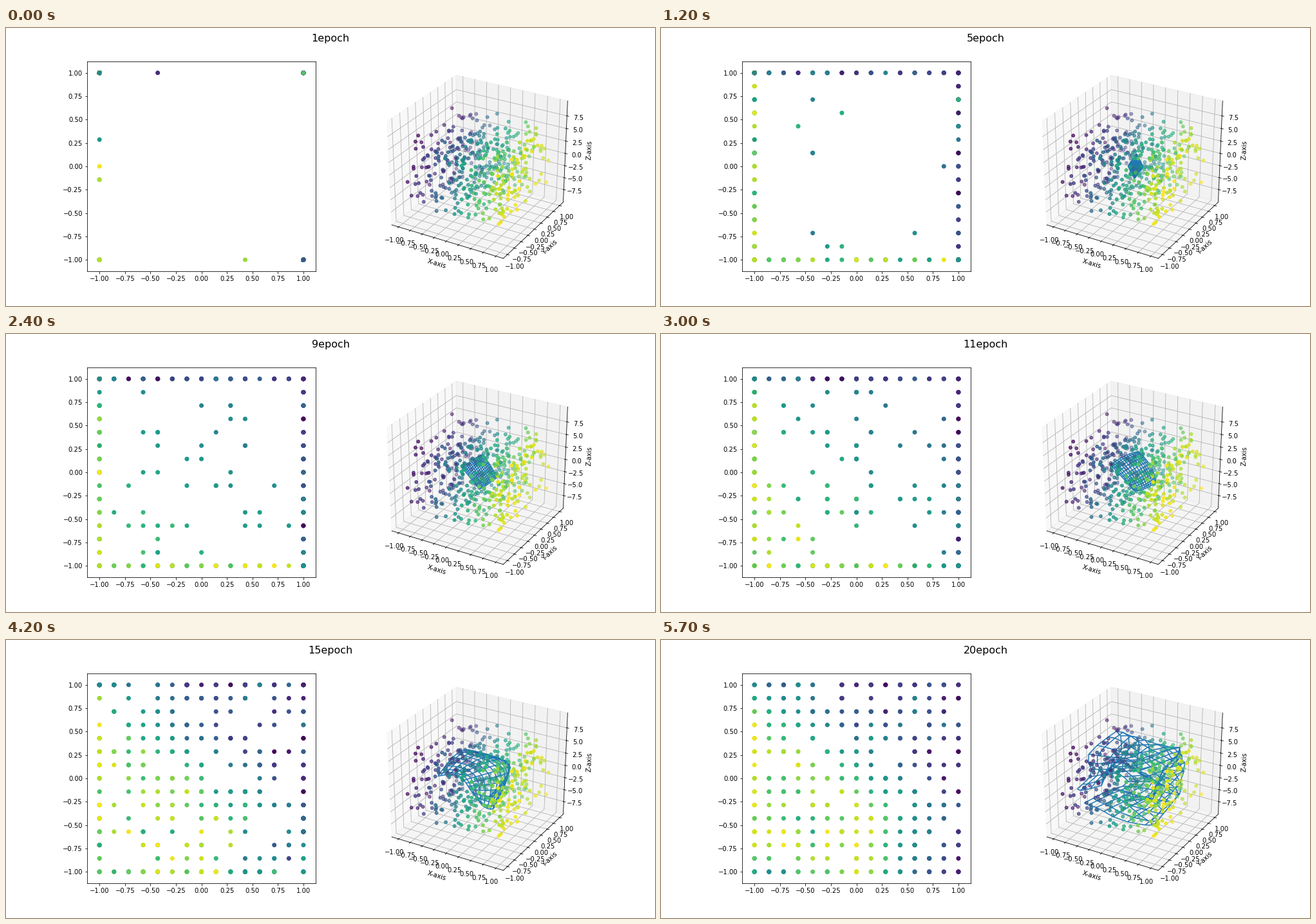
Write a matplotlib script that moves like this. It is 1008 by 432 pixels and loops after 6 s.

```python
import numpy as np
import matplotlib.pyplot as plt
from matplotlib.animation import FuncAnimation
from matplotlib.collections import LineCollection

plt.rcParams["font.family"] = "DejaVu Sans"

EPOCHS, INTERVAL = 20, 300
SIDE = 15                           # map nodes per side
COUNT = 480
BOX = np.array([1, 1, 6])           # half size of the data cloud
CENTER = np.array([0, 0, 0.12])     # middle and length of the cube axes
SPAN = np.array([2.2, 2.2, 19.76])
EDGE = 0.5 + 1 / 48                 # panes reach slightly past the unit cube
BACK = np.array([-1, 1, -1])        # corner where the three panes meet
VIEW = (-0.095, 0.09)
DIST = 10

# camera basis
ELEV, AZIM = np.radians([30, -60])
FRONT = np.array([np.cos(ELEV) * np.cos(AZIM), np.cos(ELEV) * np.sin(AZIM), np.sin(ELEV)])
RIGHT = np.array([-np.sin(AZIM), np.cos(AZIM), 0])
UP = np.cross(FRONT, RIGHT)

rng = np.random.default_rng(3)
fig = plt.figure(figsize=(14, 6), dpi=72)
fig.subplots_adjust(left=0.125, right=0.9, bottom=0.125, top=0.88, wspace=0.2)
flat = fig.add_subplot(1, 2, 1)
space = fig.add_subplot(1, 2, 2)
title = fig.suptitle("1epoch", fontsize=16)


def project(p):
    """Perspective view of points in the unit cube."""
    p = np.asarray(p, float)
    depth = DIST - p @ FRONT
    return np.stack([p @ RIGHT / depth, p @ UP / depth], axis=-1)


def to_unit(data):
    return (data - CENTER) / SPAN


def sq_dist(a, b):
    return ((a[:, None] - b[None]) ** 2).sum(axis=2)


def train(data):
    """Batch self-organising map; returns (mesh, winners) for each epoch."""
    weight = np.array([1, 1, 0.25])
    scaled = data * weight
    steps = np.linspace(-1, 1, SIDE)
    nodes = np.stack(np.meshgrid(steps, steps), axis=-1).reshape(-1, 2)

    # start almost collapsed, with a slight tilt towards width and height
    width, height = 0.4 * scaled @ RIGHT, scaled[:, 2]
    latent = 0.06 * np.column_stack([-width - height, -width + height])
    latent += rng.uniform(-0.05, 0.05, latent.shape)

    history = []
    for t in range(EPOCHS):
        sigma = max(0.14, 1.75 - 0.096 * t)
        pull = np.exp(-sq_dist(nodes, latent) / (2 * sigma ** 2))
        mesh = pull @ scaled / pull.sum(axis=1, keepdims=True)
        latent = nodes[sq_dist(scaled, mesh).argmin(axis=1)]
        history.append(((mesh / weight).reshape(SIDE, SIDE, 3), latent))
    return history


def mesh_lines(mesh):
    view = project(to_unit(mesh))
    return [*view, *view.transpose(1, 0, 2)]


def draw_pane(axis, grey):
    corners = np.full((4, 3), BACK[axis] * EDGE)
    a, b = {0, 1, 2} - {axis}
    corners[:, a] = EDGE * np.array([-1, 1, 1, -1])
    corners[:, b] = EDGE * np.array([-1, -1, 1, 1])
    color = (grey, grey, grey, 0.5)
    space.fill(*project(corners).T, facecolor=color, edgecolor=color,
               linewidth=1, zorder=0)


def draw_axis(axis, side, values, fmt, label):
    """Grid, line, ticks and texts of the axis along the cube edge at `side`."""
    side = np.array(side)
    unit = np.eye(3)[axis]
    base = side * EDGE
    grid = EDGE * np.array([side, BACK * (1 - unit), -side])
    out = side * np.eye(3)[1 if axis == 0 else 0] / 120
    size = space.get_window_extent().size
    per_point = 4 / size.sum()

    ends = project([base - EDGE * unit, base + EDGE * unit])
    space.plot(*ends.T, color="k", lw=0.8, zorder=2)
    for v in values:
        at = to_unit(v * unit) * unit
        space.plot(*project(grid + at).T, color="#b0b0b0", lw=0.8, zorder=1)
        tick = project([base + at + 2 * out, base + at - out])
        space.plot(*tick.T, color="k", lw=0.8, zorder=2)
        spot = project(base + at + side * 11.5 * per_point)
        space.text(*spot, (fmt % v).replace("-", "\u2212"), fontsize=10,
                   ha="center", va="top", zorder=2)

    dx, dy = (ends[1] - ends[0]) * size
    space.text(*project(base + side * 25 * per_point), label, fontsize=10,
               ha="center", va="center", rotation_mode="anchor",
               rotation=np.degrees(np.arctan2(dy, dx)), zorder=2)


def cloud_colors(data):
    """Viridis by x, fading with distance from the camera."""
    rgba = plt.cm.viridis((data[:, 0] + 1) / 2)
    near = to_unit(data) @ FRONT
    rgba[:, 3] = 0.3 + 0.7 * (near - near.min()) / np.ptp(near)
    return rgba


data = rng.uniform(-BOX, BOX, (COUNT, 3))
history = train(data)
quarters = np.arange(-1, 1.01, 0.25)

# left: winning map nodes
dots = flat.scatter(*history[0][1].T, c=data[:, 0], cmap="viridis",
                    vmin=-1, vmax=1, s=36)
flat.set(xlim=(-1.121, 1.121), ylim=(-1.123, 1.123),
         xticks=quarters, yticks=quarters)

# right: data cloud with the map stretched through it
space.set(xlim=VIEW, ylim=VIEW, autoscale_on=False)
space.axis("off")
for axis, grey in enumerate((0.95, 0.9, 0.925)):
    draw_pane(axis, grey)
draw_axis(0, (0, -1, -1), quarters, "%.2f", "X-axis")
draw_axis(1, (1, 0, -1), quarters, "%.2f", "Y-axis")
draw_axis(2, (1, 1, 0), np.arange(-7.5, 7.6, 2.5), "%.1f", "Z-axis")

mesh = LineCollection(mesh_lines(history[0][0]), colors="#1f77b4",
                      linewidths=1.5, zorder=3)
space.add_collection(mesh, autolim=False)
colors = cloud_colors(data)
space.scatter(*project(to_unit(data)).T, s=20, facecolors=colors,
              edgecolors=colors, linewidths=1.5, zorder=4)


def update(i):
    surface, winners = history[i]
    title.set_text(f"{i + 1}epoch")
    dots.set_offsets(winners)
    mesh.set_segments(mesh_lines(surface))
    return title, dots, mesh


anim = FuncAnimation(fig, update, frames=EPOCHS, interval=INTERVAL,
                     init_func=lambda: update(0), repeat=True, repeat_delay=0)
plt.show()
```
